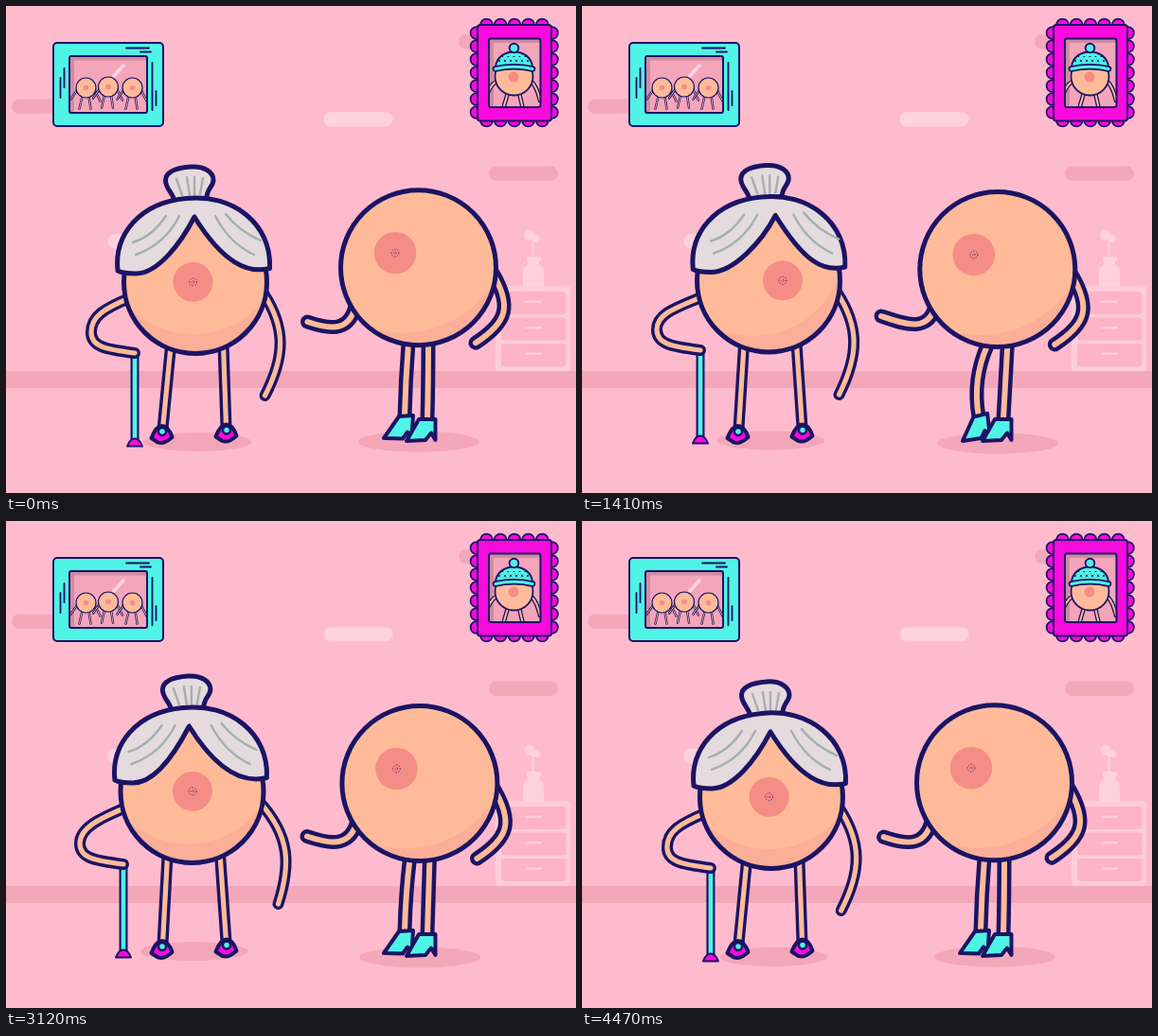
An HTML page with a canvas for the animation above (4500 ms loop, 602 by 515 pixels).

```html
<!DOCTYPE html>
<html lang="en">
<head>
<meta charset="utf-8">
<title>Two friends chatting</title>
<style>
html, body { margin: 0; width: 100%; height: 100%; overflow: hidden; background: #ffbbce; }
canvas { display: block; width: 602px; height: 515px; }
</style>
</head>
<body>
<canvas id="stage" width="602" height="515"></canvas>
<script>
const LOOP = 4500, TAU = Math.PI * 2;
const C = {
  wall: '#ffbbce', rose: '#f5a7ba', pale: '#ffd2de', cabinet: '#ffcdd9', drawer: '#ffb3c6',
  navy: '#1b1464', cyan: '#50f4e6', magenta: '#f70bdd', skin: '#ffbb99', shade: '#fbae98',
  areola: '#f58d87', hair: '#e5dadd', strand: '#a5afae', glass: '#f4a5ba', glassShade: '#cf8ba1'
};
const stage = document.getElementById('stage').getContext('2d');
const room = document.createElement('canvas');
room.width = 602;
room.height = 515;
let g = room.getContext('2d');

function paint(path, fill, stroke, width = 2) {
  if (fill) { g.fillStyle = fill; g.fill(path); }
  if (stroke) {
    g.strokeStyle = stroke;
    g.lineWidth = width;
    g.lineCap = g.lineJoin = 'round';
    g.stroke(path);
  }
}
const shape = (d, ...style) => paint(new Path2D(d), ...style);
function ellipse(x, y, rx, ry, ...style) {
  const p = new Path2D();
  p.ellipse(x, y, rx, ry, 0, 0, TAU);
  paint(p, ...style);
}
const circle = (x, y, r, ...style) => ellipse(x, y, r, r, ...style);
function box(x, y, w, h, r, ...style) {
  const p = new Path2D();
  p.roundRect(x, y, w, h, r);
  paint(p, ...style);
}
function tube(d, outer, inner, fill = C.skin) {
  shape(d, null, C.navy, outer);
  shape(d, null, fill, inner);
}

// Periodic monotone cubic through a few poses
const POSES = [0, 600, 1410, 2460, 3120, 3900];
function track(values, times = POSES) {
  const n = values.length;
  const next = i => (i + 1) % n;
  const span = times.map((t, i) => (i + 1 < n ? times[i + 1] : LOOP) - t);
  const slope = values.map((v, i) => (values[next(i)] - v) / span[i]);
  const tangent = slope.map((s, i) => {
    const before = slope[(i + n - 1) % n];
    return before * s <= 0 ? 0 : 2 * before * s / (before + s);
  });
  return t => {
    let i = n - 1;
    while (times[i] > t) i--;
    const j = next(i), h = span[i], u = (t - times[i]) / h, w = 1 - u;
    return values[i] * (1 + 2 * u) * w * w + values[j] * u * u * (3 - 2 * u)
      + h * u * w * (tangent[i] * w - tangent[j] * u);
  };
}

const granny = {
  x: track([200, 191, 197, 194.5, 196.5, 193.2]),
  y: track([292, 291.3, 290.5, 288, 286, 286.7]),
  turn: track([-2.5, 9.5, 15, 15.5, 0.5, 13.3]),
  part: track([0, 2.5, 6, 5, -2.5, 4]),
  caneX: track([136, 122.5, 125, 123.5, 124, 123.5]),
  caneY: track([367, 367, 364, 364, 363, 362.5]),
  handX: track([273.5, 265.5, 271.5, 282.5, 287.5, 275]),
  handY: track([412, 411, 411, 407, 405, 407])
};
const friend = {
  sway: track([0, 0.43, 1, 0, 0.14, 0.43, 1, 0.75], [0, 600, 1410, 2250, 2460, 3120, 3560, 3900]),
  lookX: track([-24.5, -24.5, -25, -35.5, -24.5, -24.5]),
  lookY: track([-15.5, -15.5, -15.5, -13, -15.5, -15.5]),
  handX: track([317.5, 315, 315, 317, 317, 320]),
  handY: track([334, 329.5, 328, 332, 333.5, 336]),
  step: track([0, 0, 1, 0, 0, 0.8])
};

function body(x, y, r, lightX, lightY, lightR, noseX, noseY, noseR) {
  const p = new Path2D();
  p.arc(x, y, r, 0, TAU);
  g.save();
  g.clip(p);
  paint(p, C.shade);
  circle(x + lightX, y + lightY, lightR, C.skin);
  circle(noseX, noseY, noseR, C.areola);
  g.setLineDash([1, 2]);
  circle(noseX, noseY, 4, null, '#6d315f', 0.9);
  circle(noseX, noseY, 1.3, null, '#6d315f', 0.8);
  g.restore();
  paint(p, null, C.navy, 5);
}

function drawHair(dx, dy, part) {
  const px = 199 + part;
  g.save();
  g.translate(dx, dy);
  shape('M178 207C177 198 168 193 168.5 184C169 174 182 171 195 170C210 169 219 176 219 184C219 191 212 193 212 203Z',
    C.hair, C.navy, 5);
  for (const d of ['M180 183L186 200', 'M191 181L194 200', 'M199 200L199 181', 'M208 182L205 199'])
    shape(d, null, C.strand, 2.4);
  shape(`M${px} 223C${px - 15} 252 160 283 137 283Q124 283 118 280C114 242 141 208 190 203.5`
    + `C240 198 281 231 278.5 277.5C256 283 ${px + 31} 273 ${px} 223Z`, C.hair, C.navy, 5);
  g.translate(part * 0.5, 0);
  for (const d of ['M134 250Q154 244 169 222', 'M137 263Q168 252 183 222',
    'M232 220Q246 238 269 248', 'M221 222Q236 251 262 263'])
    shape(d, null, C.strand, 2.4);
  g.restore();
}

function slipper(x, y) {
  shape(`M${x - 11} ${y + 4}Q${x - 6} ${y - 9} ${x} ${y - 9}Q${x + 7} ${y - 9} ${x + 11} ${y + 3}`
    + `Q${x + 2} ${y + 11} ${x - 4} ${y + 8.5}Z`, C.magenta, C.navy, 4);
  circle(x + 0.5, y - 3, 4, C.cyan, C.navy, 2.5);
}

function drawGranny(t) {
  const at = name => granny[name](t);
  const limb = d => tube(d, 12, 5.2);
  const x = at('x'), y = at('y'), turn = at('turn');
  const cx = at('caneX'), cy = at('caneY'), hx = at('handX'), hy = at('handY');
  ellipse(x + 2.3, y + 169, 57, 10, C.rose);

  const foot = cy + 98.5;
  tube(`M${cx} ${cy}V${foot - 6}`, 9, 4.6, C.cyan);
  shape(`M${cx - 8} ${foot}Q${cx - 5} ${foot - 8} ${cx} ${foot - 8}Q${cx + 5} ${foot - 8} ${cx + 8} ${foot}Z`,
    C.magenta, C.navy, 2);

  const ex = cx - 46, ey = cy - 22, sx = x - 70, sy = y + 17;
  limb(`M${sx} ${sy}C${sx - 26} ${sy + 11} ${ex} ${ey - 17} ${ex} ${ey}`
    + `C${ex} ${ey + 15} ${cx - 32} ${cy - 4} ${cx} ${cy}`);
  const bend = (x + 72 + hx) / 2 + 22.5;
  limb(`M${x + 72} ${y + 12}C${bend} ${y + 48} ${bend} ${y + 78} ${hx} ${hy}`);
  limb(`M${x - 26} ${y + 68}L165.5 447`);
  limb(`M${x + 29.5} ${y + 66}L232.5 445`);

  const light = (turn + 2.5) / 18;
  body(x, y, 75.5, -2 - 14 * light, -40 + 3.5 * light, 95, x + turn, y - 0.2, 21);
  drawHair(x - 200 + (turn + 2.5) * 0.13, y - 292, at('part'));
  slipper(164.5, 453);
  slipper(232.5, 451.5);
}

function drawFriend(t) {
  const at = name => friend[name](t);
  const limb = d => tube(d, 15, 6);
  const sway = at('sway'), step = at('step'), lookX = at('lookX'), lookY = at('lookY');
  const x = 435.5 + 3.3 * sway, y = 276.7 + 1.8 * sway;
  const hx = at('handX'), hy = at('handY');
  ellipse(x + 0.3, y + 184, 64, 11, C.rose);
  limb(`M${x - 65} ${y + 35}C${x - 71} ${y + 68} ${hx + 27} ${hy + 9} ${hx + 1} ${hy}`);
  limb(`M${x + 78} ${y + 5}C${x + 99.5} ${y + 41} ${x + 93.5} ${y + 58} ${x + 60.5} ${y + 79.5}`);
  limb(`M${x - 10.5} ${y + 80}Q${422 - 10 * step} 395 ${421 - 2 * step} 434`);
  limb(`M${x + 10.5} ${y + 80}Q${446 + step} 400 445 437`);

  g.save();
  g.translate(399 + 3 * step, 457.5 + 3 * step);
  g.rotate(-0.18 * step);
  shape('M16-23.5L31-24.5L29.5-2L25-7L20 0L0-0.5Z', C.cyan, C.navy, 4);
  g.restore();
  shape('M436 437H453.5V459L449 451.5L443 459L423 460Z', C.cyan, C.navy, 4);

  const side = (-24.5 - lookX) / 11;
  body(x, y, 82, -17 - 15 * side, -46 + 9 * side, 115, x + lookX, y + lookY, 22.3);
}

function drawFurniture() {
  g.fillStyle = C.wall;
  g.fillRect(0, 0, 602, 515);
  g.fillStyle = C.rose;
  g.fillRect(0, 386, 602, 18);
  for (const [x, y, color] of [[6, 98.5, C.rose], [335.5, 112, C.pale], [510, 169.5, C.rose],
    [478, 30, C.rose], [107.5, 241, C.pale]])
    box(x, y, 73, 15.5, 7.7, color);

  box(517, 296, 79, 90, 4, C.cabinet);
  for (const y of [302, 329.5, 357]) {
    box(523, y, 68.5, 24, 3, C.drawer);
    shape(`M549 ${y + 10.8}H565`, null, C.cabinet, 2.5);
  }
  shape('M550 265H565V270H563V274Q568 276 568 281V296H546V281Q546 276 551 274V270H550Z', C.pale);
  shape('M556.5 266V246', null, C.pale, 2);
  circle(553, 242.5, 5.5, C.pale);
  circle(559.5, 246, 4, C.pale);
}

function pane(x, y, w, h, drawContent) {
  const p = new Path2D();
  p.roundRect(x, y, w, h, 2);
  g.save();
  g.clip(p);
  paint(p, C.glassShade);
  box(x + 5, y + 4.5, w, h, 0, C.glass);
  drawContent();
  g.restore();
  paint(p, null, C.navy, 2);
}

function drawTrio() {
  box(50, 39, 116, 88, 4, C.cyan, C.navy, 2);
  pane(67, 53, 82, 60, () => {
    shape('M114 74L124 63', null, C.pale, 4);
    for (const x of [84.5, 108, 133.5]) {
      const y = x === 108 ? 85.5 : 86.5;
      tube(`M${x - 4} ${y + 9}L${x - 7} ${y + 22}M${x + 3} ${y + 9}L${x + 5} ${y + 22}`
        + `M${x - 9} ${y + 2}L${x - 16} ${y + 12}M${x + 9} ${y + 2}L${x + 15} ${y + 14}`, 2.4, 0.9);
      circle(x, y, 10.5, C.skin, C.navy, 1.2);
      circle(x, y, 2.8, C.areola);
    }
  });
  shape('M127 44.5H151M142 48.5H153M61.5 66V86M57.5 76V97M154.5 60V110M158.5 90V105', null, C.navy, 1.8);
}

function drawPortrait() {
  for (let i = 0; i < 5; i++)
    for (const y of [20, 121]) circle(507.5 + i * 14.7, y, 6.4, C.magenta, C.navy, 1.8);
  for (let i = 0; i < 7; i++)
    for (const x of [497, 576.5]) circle(x, 28.5 + i * 14, 6.4, C.magenta, C.navy, 1.8);
  box(498, 20, 78, 101.5, 3, C.magenta, C.navy, 2);
  pane(510, 34.5, 54.5, 72.5, () => {
    tube('M530 92L525 109M542 92L546 109M518 80Q512 83 508 94M555 80Q561 86 564 100', 4.6, 2);
    circle(536.5, 74.5, 20, C.skin, C.navy, 1.8);
    circle(536, 75, 5.5, C.areola);
    shape('M517 65C518 43 555 43 556 65Z', C.cyan, C.navy, 2);
    tube('M517 66.5Q536.5 62 556 66.5', 6.6, 3.2, C.cyan);
    circle(536.5, 44.5, 4.8, C.cyan, C.navy, 2);
    for (let i = 0; i < 6; i++) {
      const x = 521 + i * 6;
      shape(`M${x - 1} 57l2 2m0-2l-2 2`, null, C.navy, 0.8);
      if (i < 5) shape(`M${x + 3} 53.5h.8`, null, C.navy, 1.2);
    }
  });
}

drawFurniture();
drawTrio();
drawPortrait();
g = stage;

function frame() {
  const t = performance.now() % LOOP;
  g.drawImage(room, 0, 0);
  drawGranny(t);
  drawFriend(t);
  requestAnimationFrame(frame);
}
frame();
</script>
</body>
</html>
```
